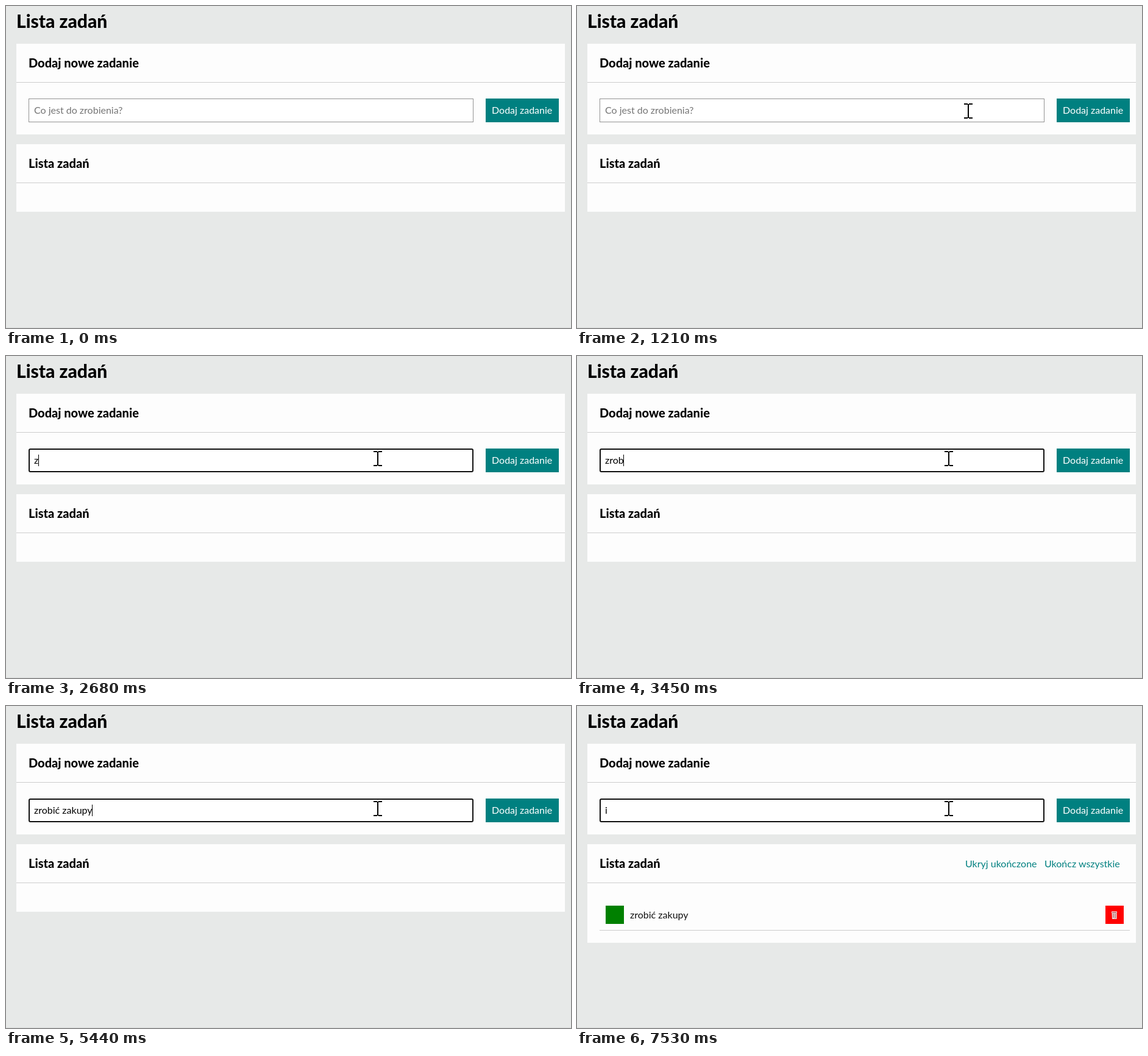
Write an HTML page with a canvas that moves like this. It is 927 px wide and 529 px high and loops after 8000 ms.

```html
<!DOCTYPE html>
<html lang="pl">
<head>
<meta charset="utf-8">
<title>Lista zadań</title>
<style>
  html, body { margin: 0; width: 100%; height: 100%; overflow: hidden; background: #e7e9e8; }
  #stage { position: relative; width: 927px; height: 529px; overflow: hidden;
    font: 16px/1.2 Lato, sans-serif; color: #000; background: #e7e9e8; }
  #stage * { position: absolute; box-sizing: border-box; margin: 0; white-space: nowrap; }
  h1, h2 { font-weight: 800; }
  h1 { left: 17px; top: 6px; font-size: 30px; }
  h2 { left: 20px; top: 19px; font-size: 20px; }
  .panel { left: 17px; width: 900px; background: #fdfdfd; }
  .head { left: 0; top: 0; width: 900px; height: 64px; border-bottom: 1px solid #ccc; }
  #field { left: 20px; top: 90px; width: 730px; height: 39px; border: 1px solid #929292; background: #fff; }
  #field.focus { border: 2px solid #101010; border-radius: 3px; }
  #text { left: 29px; top: 99px; }
  #text.hint { color: #757575; }
  #caret { top: 100px; width: 1px; height: 19px; background: #000; }
  #button { left: 770px; top: 90px; width: 120px; height: 39px; background: #008080; color: #fff; }
  #button span { left: 10px; top: 9px; }
  #added { left: 0; top: 0; width: 900px; height: 162px; }
  .link { top: 22px; color: #008080; }
  #task { left: 20px; top: 91px; width: 870px; height: 51px; border-bottom: 1px solid #ccc; }
  .box { top: 10px; width: 30px; height: 30px; }
  #task span { left: 50px; top: 15px; color: #111; }
  #edge { left: 0; top: 528px; width: 927px; height: 1px; background: #dcdddd; }
  canvas { left: 0; top: 0; }
</style>
</head>
<body>
<div id="stage">
  <h1>Lista zadań</h1>
  <div class="panel" style="top:62px;height:149px">
    <div class="head"><h2>Dodaj nowe zadanie</h2></div>
    <div id="field"></div>
    <div id="text"></div>
    <div id="caret"></div>
    <div id="button"><span>Dodaj zadanie</span></div>
  </div>
  <div class="panel" id="list" style="top:227px">
    <div class="head"><h2>Lista zadań</h2></div>
    <div id="added">
      <div class="link" style="left:620px">Ukryj ukończone</div>
      <div class="link" style="left:750px">Ukończ wszystkie</div>
      <div id="task">
        <div class="box" style="left:10px;background:#008000"></div>
        <span>zrobić zakupy</span>
        <div class="box" style="left:830px;background:#f00">
          <svg style="left:9px;top:9px" width="11" height="14">
            <path d="M1 0.5H10V3H9.5V13H2L1.5 3H1Z" fill="#e8dcdc"/>
            <path d="M2 2.5H9M4 4V11M7 4V12" stroke="#a33" fill="none"/>
          </svg>
        </div>
      </div>
    </div>
  </div>
  <div id="edge"></div>
  <canvas id="pointer" width="927" height="529"></canvas>
</div>
<script>
const LOOP = 8000, CLICK = 1510, RELEASE = 1660, SUBMIT = 5970, BLINK = 550;
const PHRASE = 'zrobić zakupy';
const KEYS = [2680, 2990, 3140, 3450, 3680, 3990, 4200, 4360, 4590, 4730, 4890, 5210, 5440];
const NEXT_KEY = 7000;
// time, x, y of the pointer's hot spot
const PATH = [
  [600, 895, 524], [820, 910, 450], [900, 888, 372], [970, 848, 295], [1050, 786, 231],
  [1130, 700, 186], [1210, 642, 173], [1280, 618, 171], [1360, 606, 170], [CLICK, 610, 169]
];

const el = id => document.getElementById(id);
const ctx = el('pointer').getContext('2d');

function drawBeam(x, y) {
  ctx.fillStyle = '#000';
  ctx.fillRect(x - 1, y - 12, 2, 23);
  for (const top of [y - 13, y + 10]) {
    ctx.fillRect(x - 7, top, 6, 2);
    ctx.fillRect(x + 1, top, 6, 2);
  }
}

function drawArrow(x, y) {
  ctx.save();
  ctx.translate(x + 0.5, y + 0.5);
  ctx.scale(1.4, 1.4);
  ctx.beginPath();
  [[0, 0], [0, 16], [3.7, 12.5], [6.3, 18.3], [8.8, 17.2], [6.3, 11.5], [11.5, 11.5]]
    .forEach(p => ctx.lineTo(...p));
  ctx.closePath();
  ctx.fillStyle = '#fff';
  ctx.fill();
  ctx.lineWidth = 0.75;
  ctx.strokeStyle = '#000';
  ctx.stroke();
  ctx.restore();
}

function drawPointer(t) {
  ctx.clearRect(0, 0, 927, 529);
  const step = PATH.filter(p => p[0] <= t).pop();
  if (!step) return;
  const [, x, y] = step;
  if (t >= CLICK && t < RELEASE) {
    ctx.fillStyle = 'rgba(255,255,0,0.47)';
    ctx.beginPath();
    ctx.arc(603, 170, 18, 0, Math.PI * 2);
    ctx.fill();
  }
  const overField = x >= 37 && x < 767 && y >= 152 && y < 191;
  (overField ? drawBeam : drawArrow)(x, y);
}

function typedAt(t) {
  if (t >= NEXT_KEY) return 'i';
  if (t >= SUBMIT) return '';
  return PHRASE.slice(0, KEYS.filter(k => k <= t).length);
}

function caretOn(t) {
  if (t < CLICK) return false;
  if (t >= NEXT_KEY) return t < 7530;
  if (t >= SUBMIT) return t >= SUBMIT + BLINK;
  if (t < KEYS[0]) return t < 2070 || t >= 2620;
  return true;
}

function render(t) {
  const typed = typedAt(t), text = el('text'), added = t >= SUBMIT;
  text.textContent = typed || 'Co jest do zrobienia?';
  text.className = typed ? '' : 'hint';
  el('field').className = t >= CLICK ? 'focus' : '';
  ctx.font = '16px Lato, sans-serif';
  el('caret').style.left = 29 + Math.floor(ctx.measureText(typed).width) + 'px';
  el('caret').style.display = caretOn(t) ? 'block' : 'none';
  el('list').style.height = (added ? 162 : 111) + 'px';
  el('added').style.display = added ? 'block' : 'none';
  drawPointer(t);
}

const start = performance.now();
function tick() {
  render((performance.now() - start) % LOOP);
  requestAnimationFrame(tick);
}
tick();
</script>
</body>
</html>
```
